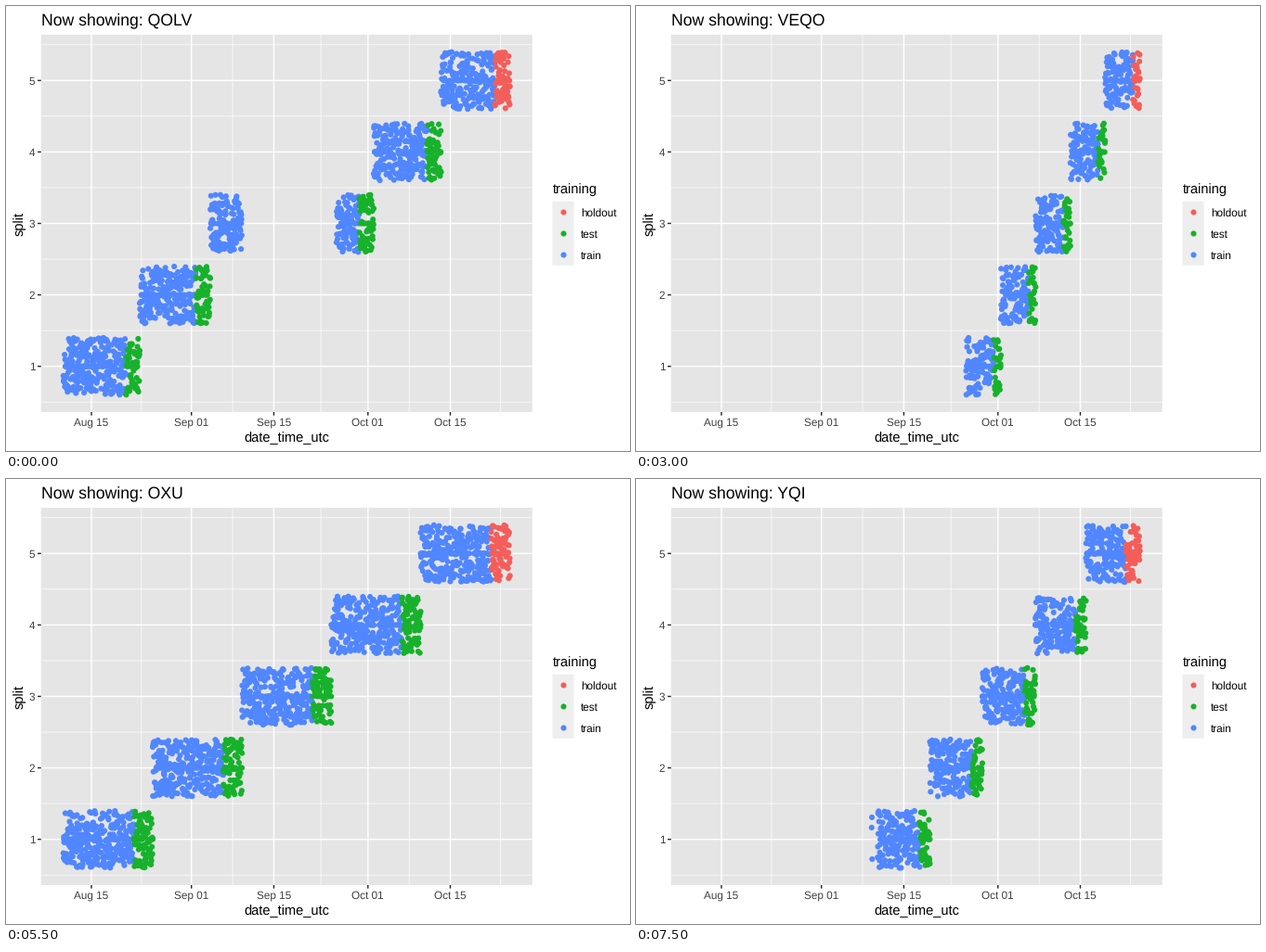
These frames come from a looping animation (672x480 px, 8 s). A matplotlib script:

```python
import numpy as np
import matplotlib.pyplot as plt
from matplotlib.animation import FuncAnimation
from matplotlib.patches import Rectangle

plt.rcParams["font.family"] = "Liberation Sans"
plt.rcParams["text.hinting"] = "none"
plt.rcParams["path.snap"] = False

W, H = 672, 480
LEFT, RIGHT, TOP, BOTTOM = 37.75, 566.75, 31, 438
ROW = (BOTTOM - TOP) / 5.28
DAY = 386.5 / 61          # pixels per day, Aug 15 to Oct 15
HOURLY = 24 / DAY         # one point an hour
START, END = 61.8, 542.7
RED, GREEN, BLUE = "#F35E5A", "#17B12B", "#5086FF"
TEXT, TICK = "#404040", "#272727"
DOT = 4.6 ** 2

TITLES = ["QOLV", "ZUJ", "WIJ", "VEQO", "KYZU", "OXU", "JEV", "YQI"]


def row_y(value):
    return BOTTOM - (value - 0.36) * ROW


def state(edges, cuts=None, share=0.8, gaps=(), strays=()):
    """Five splits between edges; each cut parts train from test."""
    edges = np.asarray(edges, float)
    if cuts is None:
        cuts = edges[:-1] + share * np.diff(edges)
    return dict(edges=edges, cuts=cuts, gaps=gaps, strays=strays)


OUTAGE = (254, 355.8)
STATES = [
    state([START, 144, 220, 396, 468.5, END], [129.5, 204.5, 380.5, 453.5, 526.5],
          gaps=[OUTAGE]),
    state([START, 148, 216, 392, 470, END], [130, 202, 377, 452, 528],
          gaps=[OUTAGE]),
    state(np.linspace(355.8, END, 6)),
    state(np.linspace(355.5, END, 6)),
    state(np.linspace(START, END, 6)),
    state([START, 151, 214, 389, 472, END], [128.5, 201.5, 375.5, 449, 529.5],
          gaps=[(82.5, 91), OUTAGE, (144, 148), (436, 444), (457.5, 463.5),
                (464.5, 470.5)]),
    state(np.linspace(START, END, 6), share=0.79),
    state([START, 120, 179, 237, 296, 355.8], share=0.79,
          strays=[(535, 5.0), (535, 4.83)]),
    state([253.8, 316.5, 373, 430, 484.5, END],
          [305.5, 361.5, 418.5, 473.5, 527.5], gaps=[(254.5, 260)]),
]


def cloud(rng, x0, x1, split, gaps):
    """Hourly jittered points plus some left exactly on the split's line."""
    n, core = int(HOURLY * (x1 - x0)), int(0.5 * (x1 - x0))
    x = np.append(np.linspace(x0, x1, n), rng.uniform(x0, x1, core))
    y = np.full(n + core, float(split))
    y[:n] += rng.uniform(-0.4, 0.4, n)
    keep = np.ones(n + core, bool)
    for a, b in gaps:
        keep &= (x < a) | (x > b)
    return np.column_stack([x, row_y(y)])[keep]


def scatter_data(index):
    s = STATES[index]
    rng = np.random.default_rng(40 + index)
    points, colors = [], []
    for i in range(5):
        a, cut, b = s["edges"][i], s["cuts"][i], s["edges"][i + 1]
        tail = RED if i == 4 else GREEN
        for x0, x1, color in ((a, cut, BLUE), (cut, b, tail)):
            pts = cloud(rng, x0, x1, i + 1, s["gaps"])
            points.append(pts)
            colors += [color] * len(pts)
    for x, y in s["strays"]:
        points.append([[x, row_y(y)]])
        colors.append(RED)
    return np.vstack(points), colors


DATA = [scatter_data(i) for i in range(len(STATES))]

fig = plt.figure(figsize=(W / 96, H / 96), dpi=96, facecolor="white")
ax = fig.add_axes([0, 0, 1, 1])
ax.set_xlim(0, W)
ax.set_ylim(H, 0)
ax.axis("off")


def box(x, y, w, h, color):
    ax.add_patch(Rectangle((x, y), w, h, fc=color, lw=0, snap=False))


def line(x, y, color, width):
    ax.plot(x, y, color=color, lw=width, solid_capstyle="butt", zorder=1.5,
            snap=False)


def label(x, y, text, size, color="black", **kw):
    return ax.text(x, y, text, fontsize=size, color=color, va="baseline", **kw)


box(LEFT, TOP, RIGHT - LEFT, BOTTOM - TOP, "#E5E5E5")

days = np.array([0, 17, 31, 47, 61, 78])
ticks = 92 + days * DAY
for x in (ticks[:-1] + ticks[1:]) / 2:
    line([x, x], [TOP, BOTTOM], "white", 0.53)
for v in np.arange(0.5, 6):
    line([LEFT, RIGHT], [row_y(v)] * 2, "white", 0.53)
for x, name in zip(ticks, ["Aug 15", "Sep 01", "Sep 15", "Oct 01", "Oct 15"]):
    line([x, x], [TOP, BOTTOM], "white", 1.07)
    line([x, x], [BOTTOM, BOTTOM + 3.67], TICK, 1.07)
    label(x, 453, name, 8.8, TEXT, ha="center")
for v in range(1, 6):
    y = row_y(v)
    line([LEFT, RIGHT], [y, y], "white", 1.07)
    line([LEFT - 3.67, LEFT], [y, y], TICK, 1.07)
    label(31.2, y + 4.2, str(v), 8.8, TEXT, ha="right")

label((LEFT + RIGHT) / 2, 469.7, "date_time_utc", 11, ha="center")
label(18, (TOP + BOTTOM) / 2, "split", 11, ha="center", rotation=90,
      rotation_mode="anchor")

KEY = 23.04
label(588.4, 202, "training", 11)
box(588.5, 210.7, KEY, 3 * KEY, "#EEEEEE")
for i, (name, color) in enumerate([("holdout", RED), ("test", GREEN), ("train", BLUE)]):
    y = 210.7 + KEY * (i + 0.5)
    ax.scatter([588.5 + KEY / 2], [y], s=DOT, c=color, linewidths=0)
    label(618.8, y + 4.4, name, 8.8)

title = label(37.5, 20, "", 13.2)
dots = ax.scatter([], [], s=DOT, linewidths=0, zorder=3)


def update(i):
    # The points switch half a second ahead of the title.
    points, colors = DATA[(i + 1) // 2]
    dots.set_offsets(points)
    dots.set_facecolor(colors)
    title.set_text("Now showing: " + TITLES[i // 2])
    return dots, title


anim = FuncAnimation(fig, update, frames=16, interval=500, repeat=True,
                     repeat_delay=0)
plt.show()
```
